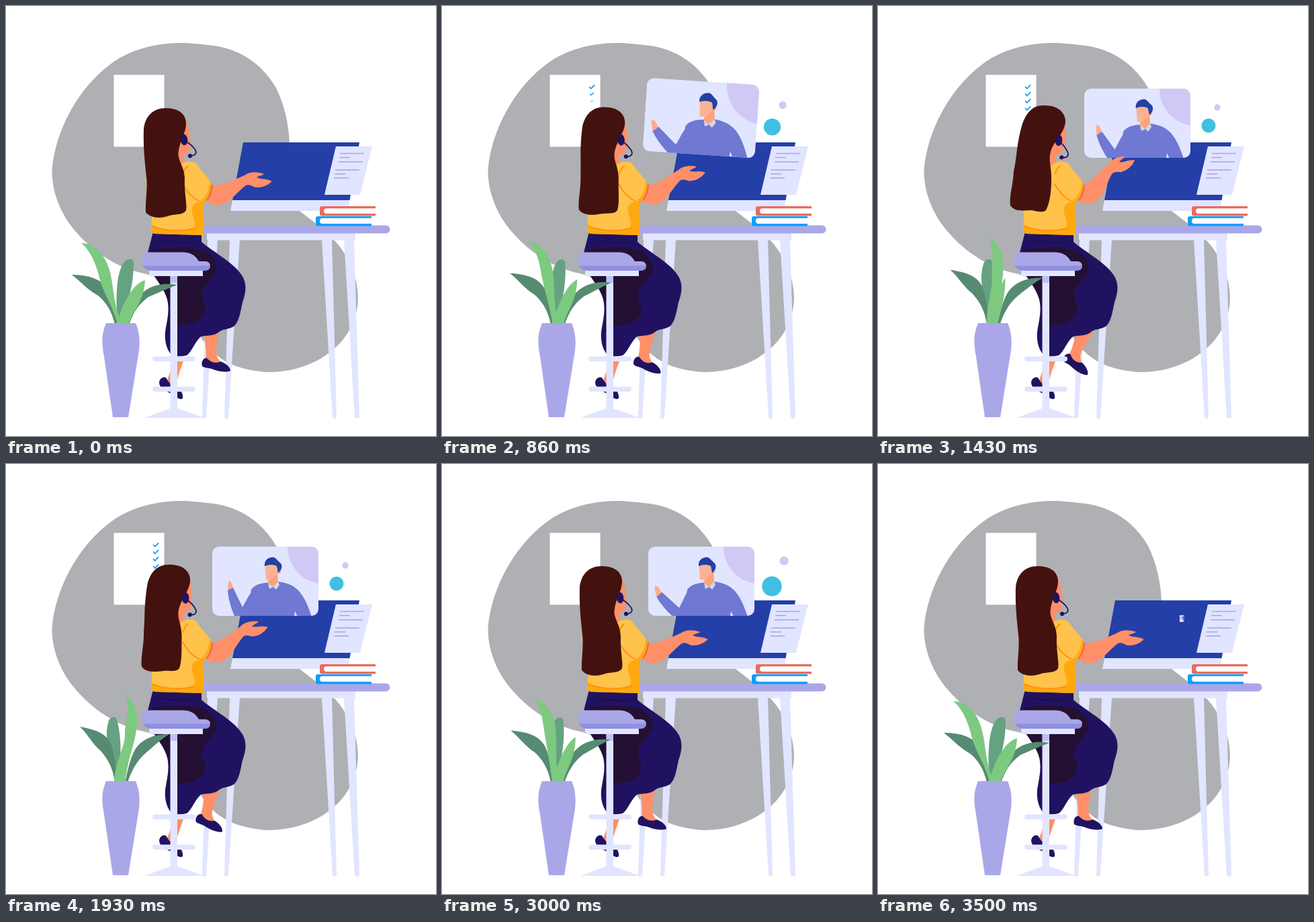
Animation, 640 px wide and 640 px high, one loop 3570 ms. Source, as an HTML page:

```html
<!DOCTYPE html>
<html lang="en">
<head>
<meta charset="utf-8">
<title>Video call</title>
<style>
html, body { margin: 0; width: 100%; height: 100%; overflow: hidden; background: #fff; }
svg { display: block; width: 100vw; height: 100vh; }
.pale { fill: #e1e5ff; }
.lilac { fill: #aaa7e8; }
.navy { fill: #211261; }
.skin { fill: #ff8f69; }
.dark { fill: #568b72; }
.mid { fill: #64a281; }
.bright { fill: #7dc97f; }
.legs { stroke: #e1e5ff; stroke-width: 2; stroke-linejoin: round; }
.line { fill: none; stroke-linecap: round; }
</style>
</head>
<body>
<svg viewBox="0 0 640 640">
  <defs><clipPath id="frame"><rect x="307" y="123" width="158" height="103" rx="10"/></clipPath></defs>

  <path fill="#afb0b3" d="M262 55C275 55 290 57 300 58C350 62 383 89 402 122C416 150 421 180 422 205C423 250 425 290 437 305C455 319 473 332 489 349C512 374 524 405 524 437C521 502 460 545 390 545C340 542 310 525 290 493C270 450 255 410 205 398C155 388 112 352 89 316C75 292 68 268 68.500 243C74 182 110 120 155 87C185 64 225 55 262 55Z"/>
  <path fill="#fff" d="M160.500 102.500H235.500V209.500H160.500Z"/>
  <g id="checks" class="line" stroke="#0a9df0" stroke-width="1.700"></g>

  <!-- monitor and note -->
  <path fill="#243fa8" d="M353 203H526L511.600 289H337Z"/>
  <path class="pale" d="M337 289H511.600L509 305H334Z"/>
  <path class="pale" d="M491 209H545L527 281H474Z"/>
  <path stroke="#a8a4e6" stroke-width="1.300" d="M497 219.500H533M496 225.500H512M495 232H531M490 244H526M489 250H505M488 256H510"/>

  <!-- table and books -->
  <path class="pale legs" d="M301 348H314L297 612Q295 614 293 612ZM334 348H347L330 612Q328 614 326 612ZM471 348H484L491 612Q489 614 487 612ZM504 348H517L525 612Q522 614 520 612Z"/>
  <path class="pale" d="M299 338H520V348.500H299Z"/>
  <path class="lilac" d="M290 326.500H565.500A6 6 0 0 1 565.500 338.500H290Z"/>
  <path fill="#ea6c5e" d="M550 298H470Q467 298 467 301V309.500Q467 312.500 470 312.500H550Z"/>
  <path fill="#0aa0fb" d="M544 313H464Q461 313 461 316V324.500Q461 327.500 464 327.500H544Z"/>
  <path fill="#fff" d="M550.500 301.300H477Q473 301.300 473 305T477 309H550.500ZM544.500 315.800H471Q467 315.800 467 320T471 324H544.500Z"/>

  <!-- call window -->
  <g id="card">
    <g clip-path="url(#frame)">
      <path class="pale" d="M307 123H465V226H307Z"/>
      <circle cx="474" cy="123.500" r="55" fill="#d0c9f5"/>
      <path fill="#ffab8c" data-k="man" d="M319 198C318 191 315 186 317 181L321 183L324 187L327 194Z" data-to="M330 189C331 184 330 178 332 173L336 177L337 181L338 187Z"/>
      <g fill="#6f78d2">
        <path data-k="man" d="M374 181C362 190 359 205 353 214L327 191L319 198C325 208 335 220 345 228L372 228Z" data-to="M374 181C364 189 358 203 352 213L338 184L330 188C331 200 335 216 341 228L372 228Z"/>
        <path d="M385 177L405 175C420 177 428 181 436 189C446 201 450 213 455 227H434L430 219L429 227H366C369 212 362 200 365 187C370 180 378 178 385 177Z"/>
      </g>
      <path fill="#d3d9e2" d="M390 177L405 174L407 180L402 187L398 183L392 186Z"/>
      <path fill="#ffa17d" d="M391 168L404 160L405 175L397 183L390 177Z"/>
      <g id="manHead">
        <circle cx="404.500" cy="159.500" r="3.500" fill="#ffa17d"/>
        <path fill="#f9b394" d="M384.500 151L402 149L403 164L394 172L386 172.500Z"/>
        <path fill="#2440a4" d="M384 152C383 143 390 138 398 139C402 141 404 145 408 148C411 152 409 159 404 162L402 152C396 149 390 150 384 152Z"/>
      </g>
    </g>
  </g>
  <g id="dots">
    <circle cx="492" cy="178" r="10.500" fill="#40bfe0"/>
    <circle cx="505" cy="151" r="4.700" fill="#d0c9f5"/>
  </g>

  <!-- legs and skirt -->
  <path class="skin" d="M250 518L265 526C260 540 255 552 253 566L238 562C243 550 248 535 250 518Z"/>
  <path class="navy" d="M228 560C229 554 234 551 238 553C242 560 246 565 252 566C259 570 264 576 263 584C258 588 252 580 246 577C238 573 228 569 228 560Z"/>
  <g id="foot">
    <path class="skin" d="M295 482L317 482C315 500 311 512 314 522L321 533L304 534L297 525C299 512 295 497 295 482Z"/>
    <path class="navy" d="M292 536C290 529 294 523 299 524C304 530 312 533 319 529C326 531 334 537 334 543C328 546 315 544 306 540C300 538 295 539 292 536Z"/>
  </g>
  <path class="navy" d="M219 336H291V351C305 364 336 380 349 398C360 412 357 427 352 441C349 455 347 470 339 477C330 482 323 480 316 486C307 492 297 490 290 492C281 500 277 514 269 520C262 522 252 522 246 519C238 510 236 497 237 485C239 470 244 455 240 437C236 422 226 411 220 400L211 367Z"/>
  <path fill="#231033" d="M212 367C224 358 250 359 280 361C300 363 313 374 314 390C311 406 294 414 292 427C291 438 299 446 296 456C290 472 276 475 262 475C253 475 247 482 241 486C242 468 246 455 241 438C237 422 226 411 220 400Z"/>
  <path class="line" stroke="#180b4a" stroke-width="1.200" d="M229 348C245 352 265 353 284 352"/>

  <!-- stool -->
  <path class="pale" d="M244.500 400H255V599L295 613H206L244.500 599Z"/>
  <path class="lilac" opacity=".6" d="M244.500 402H255V412H244.500Z"/>
  <rect class="pale" x="218" y="521.500" width="64" height="7.500" rx="3.700"/>
  <rect class="pale" x="218" y="566.500" width="64" height="7.500" rx="3.700"/>
  <path class="pale" d="M213 393H293V402H213Z"/>
  <path class="lilac" d="M208 366.500H264C277 367 283 373 287 380H297Q304 381 304 387H204C202 378 202 366.500 208 366.500Z"/>
  <path fill="#918fe0" d="M203.500 386.500H304Q304 394 296 394H215Q207 393 203.500 386.500Z"/>

  <!-- upper body -->
  <path id="arm" class="skin" d="M304 266C320 269 336 260 356 251.500C361 247 373 246 383 249.500C385 252 377 252 373 255C379 258 389 257 395 260.500C396 263 391 263 392 264C391 266 388 266 387 267C382 270 376 270 371 270C366 268 362 265 357 267C346 275 336 289 324 294.500C313 299 303 295 297 289Z"/>
  <path class="skin" d="M250 212L263 220L266 240L250 245Z"/>
  <path fill="#f2604c" d="M303 262L308 267C307 277 304 285 299 290L294 288Z"/>
  <path fill="#ffc24a" d="M258 238C263 232 274 229 283 234C288 243 298 252 305 262C306 274 302 284 297 289C289 294 294 310 295 324L293 341L221 339Q215 337 216 328C220 304 212 285 208 258L215 240Z"/>
  <path fill="#ffa90f" d="M303 260L306 265C305 277 301 286 297 290C291 296 293 310 295 324L293 341L221 339Q215 337 216 324C230 336 262 337 280 329C284 320 275 311 277 300C280 290 289 294 295 285C300 279 303 270 303 260Z"/>
  <path class="line" stroke="#ff8d0a" stroke-width="1.600" d="M263 265C269 276 278 286 287 290M264 250C265 244 267 241 271 238M219 328C236 335 262 336 283 331"/>
  <path id="face" class="skin" d="M254 163L268 170C273 182 276 202 273 214C271 222 264 222 259 220L252 212Z"/>
  <path fill="#43120f" data-k="pose" d="M238 152C256 152 268 160 268 175C268 188 259 200 257 215C254 230 265 236 266 256C265 280 270 294 268 304C264 312 250 309 240 313C228 317 214 315 208 307C207 292 211 275 209 255C207 235 204 213 205 183C207 165 218 152 238 152Z" data-to="M245 148C265 147 279 157 279 172C278 187 266 197 259 211C252 228 258 235 258 256C258 276 256 292 250 304C246 308 236 306 229 304C216 304 204 307 197 297C195 283 201 267 202 246C207 225 206 205 215 175C221 158 231 148 245 148Z"/>
  <g id="headset">
    <ellipse class="navy" cx="265" cy="199" rx="5.300" ry="8.300" transform="rotate(-6 265 199)"/>
    <path class="line" stroke="#211261" stroke-width="1.800" d="M269 202C278 208 284 215 282.500 219C281 223 277 223 274 223"/>
    <circle class="navy" cx="274" cy="223" r="3.100"/>
  </g>

  <!-- plant -->
  <path class="mid" data-k="sway" d="M167 472C162 440 164 390 178 379C183 375 190 376 190 383C190 410 184 435 171 472Z" data-to="M163 472C161 440 144 415 152 385C153 378 160 374 164 378C172 400 172 440 168 472Z"/>
  <path class="dark" data-k="sway" d="M98 400C118 400 140 404 151 421C160 436 164 455 166 474L162 474C157 453 149 441 137 431C122 423 112 411 98 400Z" data-to="M110 391C130 395 148 399 156 416C161 432 164 452 165 474L162 474C159 452 152 440 141 427C128 416 121 401 110 391Z"/>
  <path class="dark" data-k="sway" d="M255 415C230 411 208 417 195 436C187 447 183 460 179 474L183 474C190 455 197 444 212 433C226 427 240 421 255 415Z" data-to="M243 402C222 402 203 408 192 425C184 440 181 457 177 474L181 474C187 456 194 443 207 431C219 421 230 410 243 402Z"/>
  <path class="bright" data-k="sway" d="M112 353C134 353 150 374 155 397C161 420 160 450 174 474L166 474C160 448 146 430 140 408C135 386 126 364 112 353Z" data-to="M176 340C190 352 199 372 194 396C190 424 180 442 177 474L161 474C162 444 176 424 177 404C176 384 188 362 176 340Z"/>
  <path class="bright" data-k="sway" d="M207 408C192 412 175 435 165 474L182 474C190 450 205 442 207 408Z" data-to="M185 404C180 414 174 435 164 474L177 474C180 450 186 438 185 404Z"/>
  <path class="lilac" d="M149 472H193C200 488 200 505 196 525L182 612H159L146 522C142 502 142 488 149 472Z"/>
</svg>
<script>
const LOOP = 3570, FPS = 14;
const $ = id => document.getElementById(id);
const place = (id, value) => $(id).setAttribute('transform', value);
const clamp = x => Math.max(0, Math.min(1, x));
const ease = (n, a, b) => { const x = clamp((n - a) / (b - a)); return x * x * (3 - 2 * x); };
const rise = (n, a, b, c, d) => ease(n, a, b) - ease(n, c, d);

// Piecewise linear value through [step, value] pairs
function track(n, keys) {
  const i = keys.findIndex(k => k[0] >= n);
  if (i < 1) return keys[i ? keys.length - 1 : 0][1];
  const [a, u] = keys[i - 1], [b, v] = keys[i];
  return u + (v - u) * (n - a) / (b - a);
}

const cardScale = [[2, 0], [3, .065], [7, 1.045], [9, 1.13], [10, 1.12], [12, 1.06], [13, 1]];
const cardTurn = [[3, -90], [7, -2.8], [9, 18], [10, 15.5], [12, 3.8], [13, 0]];
const dotScale = [[9, 0], [10, .5], [11, 1.4], [12, 1.2], [13, 1]];

const checks = [120.5, 131, 141.5, 152.5].map(y => {
  const path = document.createElementNS('http://www.w3.org/2000/svg', 'path');
  path.setAttribute('d', 'M-3.500 0L-1.300 2.500L3.700 -2.700');
  $('checks').append(path);
  return { path, y };
});

const morphs = [...document.querySelectorAll('[data-to]')].map(el => ({
  el, from: el.getAttribute('d'), to: el.dataset.to.match(/[\d.]+/g), key: el.dataset.k
}));

function draw(n) {
  const pose = rise(n, 6, 20, 21, 34);
  const part = { pose, sway: rise(n, 5, 26, 32, 49), man: rise(n, 10, 28, 32, 43) };

  for (const { el, from, to, key } of morphs) {
    let i = 0;
    el.setAttribute('d', from.replace(/[\d.]+/g, v => (+v + (to[i++] - v) * part[key]).toFixed(2)));
  }
  for (const id of ['face', 'headset']) {
    place(id, `translate(${4 * pose} ${pose}) rotate(${11 * pose} 265 199)`);
  }
  place('arm', `rotate(${-22 * pose} 308 280)`);
  place('foot', `rotate(${22 * pose} 307 489)`);
  place('manHead', `translate(${3 * part.man - 2} 0)`);

  // The window leaves by the way it came, a little faster
  const c = n < 42 ? n : 13 - (n - 42) * 10 / 7;
  place('card', `translate(455.500 225.500) rotate(${track(c, cardTurn)}) scale(${track(c, cardScale)}) translate(-455.500 -225.500)`);
  place('dots', `translate(494.500 168) scale(${track(Math.min(n, 53 - n), dotScale)}) translate(-494.500 -168)`);

  checks.forEach(({ path, y }, i) => {
    const s = clamp((n - 9.2 - .75 * i) / 2.8) * clamp(1 - (n - 32.7) / 5);
    path.setAttribute('transform', `translate(223 ${y}) scale(${s})`);
    path.setAttribute('visibility', s ? 'visible' : 'hidden');
  });
}

function tick() {
  draw(Math.floor((performance.now() % LOOP + 5) * FPS / 1000));
  requestAnimationFrame(tick);
}
tick();
</script>
</body>
</html>
```
